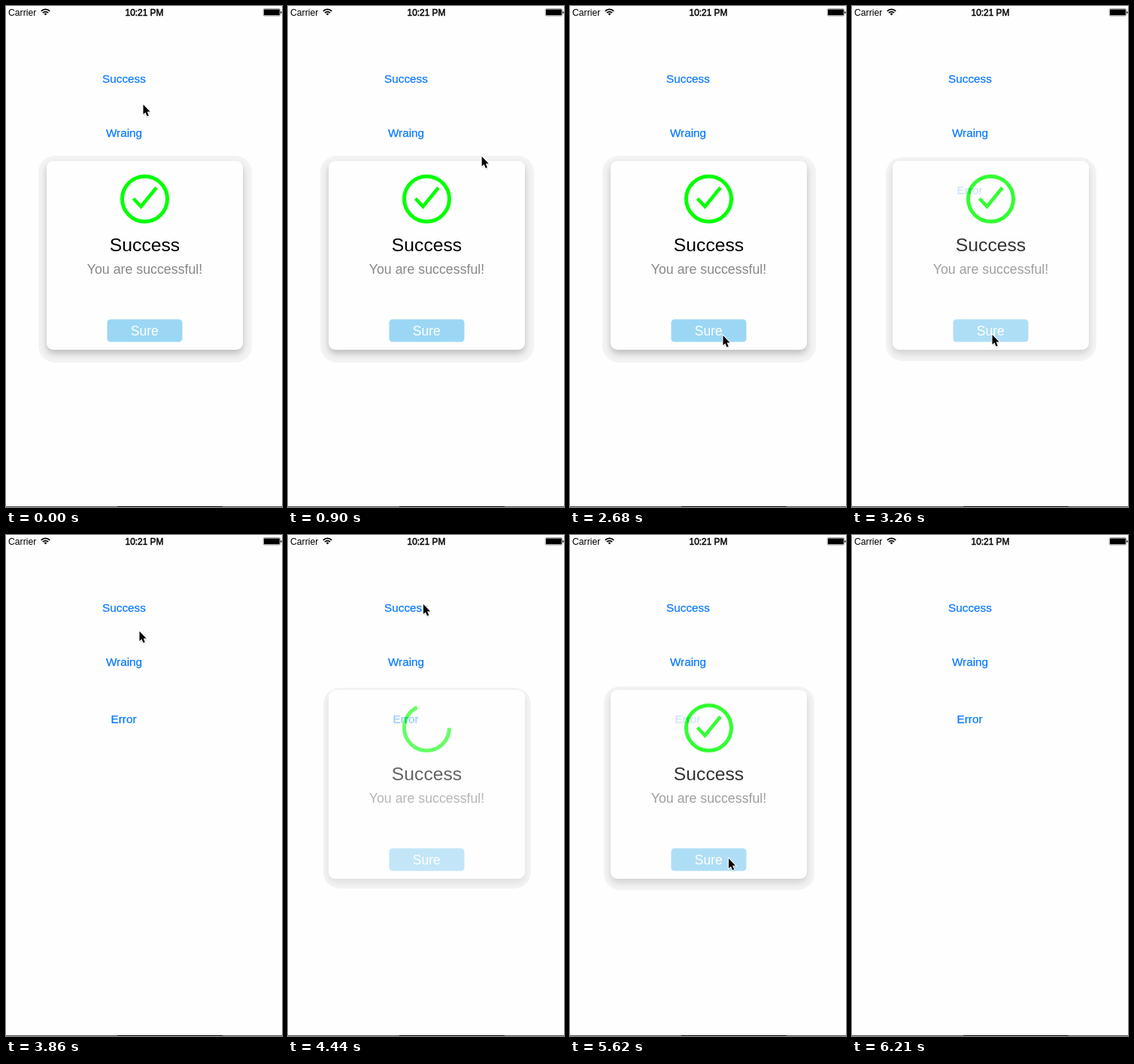
An HTML page that plays this animation: 367 px wide and 666 px high, repeating every 6.63 s.

```html
<!DOCTYPE html>
<html lang="en">
<head>
<meta charset="utf-8">
<title>Alert demo</title>
<style>
  html, body { margin: 0; width: 100%; height: 100%; overflow: hidden; background: #fefefe; }
  svg { display: block; width: 367px; height: 666px; font-family: "Liberation Sans", Arial, sans-serif; }
  .mid { text-anchor: middle; }
  .links { font-size: 15.3px; fill: #0a7aff; stroke: #0a7aff; stroke-width: .25; }
</style>
</head>
<body>
<svg viewBox="0 0 367 666">
  <defs>
    <filter id="blur" x="-20%" y="-20%" width="140%" height="140%"><feGaussianBlur stdDeviation="5"/></filter>
    <filter id="soft" x="-50%" y="-50%" width="200%" height="200%"><feGaussianBlur stdDeviation="1"/></filter>
    <rect id="card" x="54" y="206" width="261" height="251" rx="9"/>
    <path id="arrow" d="M0 0V13L3 10.4L5 15.4L7.3 14.4L5.2 9.5H9.1Z"/>
  </defs>
  <rect width="367" height="666" fill="#fefefe"/>

  <!-- status bar -->
  <text x="3" y="12.8" font-size="12.2">Carrier</text>
  <g fill="none" stroke="#000" stroke-width="1.7">
    <path d="M46.8 6.8a8 8 0 0 1 11.4 0M48.9 9.1a5 5 0 0 1 7.2 0"/>
    <path d="M50.6 10.4L52.5 12.6L54.4 10.4a2.8 2.8 0 0 0-3.8 0z" fill="#000" stroke="none"/>
  </g>
  <text class="mid" x="184" y="12.6" font-size="11.9" stroke="#000" stroke-width=".45">10:21 PM</text>
  <rect x="342.2" y="3.7" width="22.4" height="9.4" rx="1.5" fill="none" stroke="#000" stroke-width=".4"/>
  <rect x="343" y="4.6" width="20.8" height="7.6" rx=".6"/>
  <path d="M365.2 6.9q1.4 0 1.4 1.6t-1.4 1.6z"/>

  <!-- bottom edge -->
  <rect y="665" width="367" height="1" fill="#555"/>
  <rect x="148" y="665" width="140" height="1"/>

  <rect id="halo" rx="22" fill="#f3f3f3"/>
  <use href="#card" fill="#fefefe"/>

  <g class="mid links">
    <text x="157" y="102">Success</text>
    <text x="157" y="174">Wraing</text>
    <text x="156.5" y="250">Error</text>
  </g>

  <g id="alert" class="mid">
    <use id="shadow" href="#card" y="5" filter="url(#blur)"/>
    <use href="#card" fill="#fefefe"/>
    <g fill="none" stroke="#0f0" stroke-width="5">
      <path id="ring" pathLength="1" d="M214.5 256.5a30 30 0 1 1-60 0a30 30 0 1 1 60 0"/>
      <path id="tick" pathLength="1" stroke-width="4.6" d="M169.5 256L179.5 266.5L200 241.5"/>
    </g>
    <text x="184.5" y="326" font-size="24.7">Success</text>
    <text x="184.5" y="355.7" font-size="17.8" fill="#888">You are successful!</text>
    <rect x="134.5" y="416.5" width="100" height="30" rx="4.5" fill="#9bd7f5"/>
    <text x="184.3" y="437.8" font-size="17.5" fill="#fff">Sure</text>
  </g>

  <g id="cursor">
    <use href="#arrow" x=".5" y="1.5" opacity=".35" filter="url(#soft)"/>
    <use href="#arrow" stroke="#fff" stroke-width="2" paint-order="stroke"/>
  </g>
</svg>
<script>
const LOOP = 6630, TICK = 147.8;   // the picture is refreshed once per tick
const HIDE_1 = 21, SHOW = 29, HIDE_2 = 37, GONE = 42;

// The hand moves from stop to stop; bend bows the way sideways.
const home = { x: 182.5, y: 131 };
const legs = [
  { from: 0, to: 4, x: 250, y: 164, bend: 0 },
  { from: 5, to: 9, x: 257, y: 395, bend: 14 },
  { from: 11.5, to: 18, x: 203.5, y: 438, bend: 0 },
  { from: 18, to: 20, x: 186.5, y: 437, bend: -16 },
  { from: 22, to: 27, x: 180, y: 92, bend: -10 },
  { from: 30, to: 36, x: 211, y: 430, bend: 0 },
  { from: 38, to: GONE, x: 360, y: 634, bend: 0 }
];

const $ = id => document.getElementById(id);
const clamp = v => Math.max(0, Math.min(1, v));
const smooth = u => u * u * (3 - 2 * u);
const fadeIn = n => clamp(.6 * n);
const fadeOut = n => n < 0 ? 1 : clamp(1 - .2 * n * n);

function set(id, attrs) {
  for (const name in attrs) $(id).setAttribute(name, attrs[name]);
}

function trim(id, part) {
  const p = clamp(part);
  set(id, {
    "stroke-dasharray": p < 1 ? p + " 2" : "none",
    visibility: p > 0 ? "visible" : "hidden"
  });
}

function cursorAt(k) {
  let { x, y } = home;
  for (const leg of legs) {
    const e = smooth(clamp((k - leg.from) / (leg.to - leg.from)));
    x += (leg.x - x) * e + leg.bend * Math.sin(Math.PI * e);
    y += (leg.y - y) * e;
  }
  return { x, y };
}

function render(t) {
  const k = Math.floor(t / TICK);
  const alpha = k < SHOW ? fadeOut(k - HIDE_1) : Math.min(fadeIn(k - SHOW), fadeOut(k - HIDE_2));
  const drawn = k < SHOW ? 1 : .544 * (k - SHOW);
  const inset = (1 - alpha) * 10;

  set("alert", { opacity: alpha });
  set("shadow", { opacity: .22 * alpha });
  set("halo", {
    x: 43 + inset, y: 199 + inset,
    width: 284 - 2 * inset, height: 275 - 2 * inset,
    opacity: clamp(alpha * 2)
  });

  // the ring takes 80% of the stroke, the tick the rest
  trim("ring", drawn / .8);
  trim("tick", (drawn - .8) / .2);

  const { x, y } = cursorAt(k);
  set("cursor", {
    transform: `translate(${x} ${y})`,
    visibility: k < GONE ? "visible" : "hidden"
  });
}

const start = performance.now();
function loop() {
  render((performance.now() - start) % LOOP);
  requestAnimationFrame(loop);
}
loop();
</script>
</body>
</html>
```
